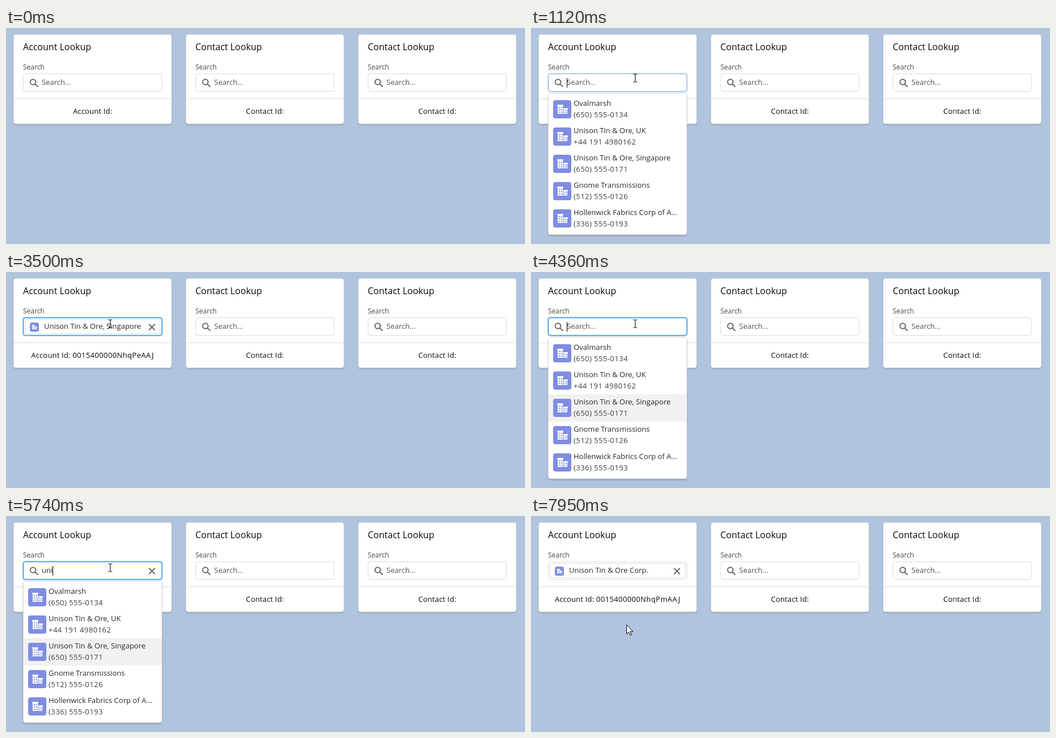
An HTML page for the animation above (8 s loop, 914 by 380 pixels).

```html
<!DOCTYPE html>
<html lang="en">
<head>
<meta charset="utf-8">
<title>Lookup</title>
<style>
html, body { margin: 0; width: 100%; height: 100%; overflow: hidden; background: #b0c4de; }
svg { display: block; width: 914px; height: 380px; }
text { font: 13px "Open Sans", "Noto Sans", sans-serif; fill: #2b2826; white-space: pre; }
.title { font-size: 16px; fill: #080707; }
.label { font-size: 12px; fill: #4a4846; }
.hint { fill: #54514f; }
.foot { fill: #080707; text-anchor: middle; letter-spacing: .16px; }
.id { letter-spacing: .37px; }
.phone { letter-spacing: .45px; fill: #3e3e3c; }
.box { fill: #fff; stroke: #dddbda; }
.card { filter: drop-shadow(0 2px 1px rgba(0, 0, 0, .13)); }
.menu { filter: drop-shadow(0 2px 1.5px rgba(0, 0, 0, .18)); }
.ring { fill: none; stroke: #1589ee; }
.glow { fill: none; stroke: #0070d2; stroke-width: 3; opacity: .25; }
.tool { fill: none; stroke: #6b6570; stroke-width: 2; }
.pointer { fill: #fff; stroke: #000; stroke-linejoin: round; }
</style>
</head>
<body>
<svg id="stage" viewBox="0 0 914 380" xmlns="http://www.w3.org/2000/svg"></svg>
<script>
const LOOP = 8000;
const CARD_GAP = 303.5;
const ROW_TOP = 119, ROW_H = 48;
const PLACE = 'Unison Tin & Ore';
const LISTS = [
  [
    ['Ovalmarsh', '(650) 555-0134'],
    [PLACE + ', UK', '+44 191 4980162'],
    [PLACE + ', Singapore', '(650) 555-0171'],
    ['Gnome Transmissions', '(512) 555-0126'],
    ['Hollenwick Fabrics Corp of A...', '(336) 555-0193']
  ],
  [
    ['Prompt Carriage and Transfers', '(503) 555-0148'],
    [PLACE + ' Corp.', '(212) 555-0150'],
    [PLACE + ', Singapore', '(650) 555-0171'],
    [PLACE + ', UK', '+44 191 4980162'],
    ['University of Arizona', '(520) 555-0119']
  ]
];

const stage = document.getElementById('stage');

function add(parent, tag, attrs, text) {
  const el = document.createElementNS(stage.namespaceURI, tag);
  for (const key in attrs) el.setAttribute(key, attrs[key]);
  if (text) el.textContent = text;
  parent.appendChild(el);
  return el;
}
const group = (parent, attrs) => add(parent, 'g', attrs || {});
const label = (parent, x, y, cls, text) => add(parent, 'text', { x, y, class: cls }, text);
const rect = (parent, x, y, width, height, rx, attrs) =>
  add(parent, 'rect', { x, y, width, height, rx, ...attrs });
const show = (el, on) => el.setAttribute('visibility', on ? 'inherit' : 'hidden');
const setText = (el, text) => { if (el.textContent !== text) el.textContent = text; };

function building(parent, x, y, size) {
  const g = group(parent, { transform: `translate(${x} ${y}) scale(${size / 32})` });
  rect(g, 0, 0, 32, 32, size < 20 ? 7 : 4, { fill: '#7f8de1' });
  add(g, 'path', {
    fill: '#fff', 'fill-rule': 'evenodd',
    d: 'M7 8h11v2h-1v14H8V10H7ZM10 12v2h2v-2ZM13.5 12v2h2v-2ZM10 16v2h2v-2ZM13.5 16v2h2v-2Z' +
       'M10 20v2h2v-2ZM13.5 20v2h2v-2ZM18 14h8v2h-1v8h-7ZM19.5 17v2h1.5v-2ZM22.3 17v2h1.5v-2Z' +
       'M19.5 20.5v2h1.5v-2ZM22.3 20.5v2h1.5v-2Z'
  });
}

function makeCard(i, name) {
  const g = group(stage, { transform: `translate(${i * CARD_GAP} 0)` });
  rect(g, 13.5, 11.5, 278, 157, 4, { class: 'box card' });
  label(g, 30, 39, 'title', name + ' Lookup');
  label(g, 30, 73, 'label', 'Search');
  add(g, 'path', { d: 'M13.5 124.5H291.5', stroke: '#dddbda' });
  const foot = label(g, 152.5, 151, 'foot', name + ' Id:');
  rect(g, 30.5, 80.5, 244, 31, 4, { class: 'box' });
  const search = group(g);
  add(search, 'path', {
    class: 'tool',
    d: 'M52.4 95a4.8 4.8 0 1 1 -9.6 0a4.8 4.8 0 1 1 9.6 0M51 98.5L56.4 103.6'
  });
  const hint = label(search, 63, 100, 'hint', 'Search...');
  return { g, foot, search, hint };
}

const [card] = ['Account', 'Contact', 'Contact'].map((name, i) => makeCard(i, name));
const idPart = add(card.foot, 'tspan', { class: 'id' });

const ring = group(stage);
rect(ring, 30, 80, 245, 32, 4, { class: 'glow' });
rect(ring, 30.5, 80.5, 244, 31, 4, { class: 'ring' });

const pill = group(stage);
rect(pill, 33.5, 83.5, 238, 25, 2, { class: 'box' });
building(pill, 42, 89, 16);
const pillName = label(pill, 67, 100, '', '');
const typed = label(stage, 63, 100, '', '');
const clear = add(stage, 'path', { class: 'tool', d: 'M251.8 91.8l10.4 10.4m0 -10.4l-10.4 10.4' });
const caret = rect(stage, 63, 88, 1, 17, 0, { fill: '#000' });

const menu = group(stage);
rect(menu, 30.5, 114.5, 244, 249, 4, { class: 'box menu' });
const rows = LISTS[0].map((_, i) => {
  const g = group(menu, { transform: `translate(0 ${ROW_TOP + i * ROW_H})` });
  const back = rect(g, 31, 0, 243, ROW_H, 0, { fill: '#f2f1f1' });
  building(g, 39, 8, 32);
  return { back, name: label(g, 75, 18, '', ''), phone: label(g, 75, 38, 'phone', '') };
});

const cursors = {
  arrow: add(stage, 'path', {
    class: 'pointer', d: 'M.5 .5V16.5L4.2 13.2L6.7 18.7L9 17.7L6.6 12.2H11.5Z'
  }),
  beam: add(stage, 'path', {
    fill: 'none', stroke: '#000',
    d: 'M-3 -7H-1L.5 -6L2 -7H4M.5 -6.5V6.5M-3 7H-1L.5 6L2 7H4'
  }),
  hand: add(stage, 'path', {
    class: 'pointer',
    d: 'M1.5 .5C.4 .5 0 1.2 0 2V13L-2 11C-3 10 -4.4 10.5 -4.4 11.7C-4.4 13 -1.4 16 0 18.6V22.5H9.5V19' +
       'C11 17 11.6 15.5 11.6 12V9.5C11.6 8 9.2 7.7 8.8 9C8.6 7.4 6.2 7.2 6 8.5C5.6 7 3.3 7 3 8V2' +
       'C3 1.1 2.6 .5 1.5 .5ZM3 8V12M6 8.5V12M8.8 9V12'
  })
};

const within = (t, ...spans) => spans.some(([a, b]) => t >= a && t < b);
const bezier = (a, b, c, p) => a * (1 - p) ** 2 + 2 * b * p * (1 - p) + c * p * p;

// Pointer moves in the same coarse steps as the screen capture
function pointerAt(t) {
  if (t < 120) return null;
  if (t < 820) {
    const p = Math.floor((t - 120) / 700 * 9) / 9;
    const e = bezier(0, .55, 1, p);
    return [bezier(740, 430, 173, e), bezier(335, -55, 83, e)];
  }
  if (t < 970) return [173, 83];
  if (t < 1120) return [189, 91];
  if (t < 1200) return [183, 88];
  if (t < 6880) return [183, 91];
  if (t < 7950) {
    const p = Math.min(7, Math.floor((t - 6880) / 75) + 1) / 7;
    const e = bezier(0, .6, 1, p);
    return [183 - 15 * e, 91 + 96 * e];
  }
  return [168, 191];
}

function overInput(x, y) {
  const local = (x - 30) % CARD_GAP;
  return x >= 30 && local <= 245 && y >= 80 && y <= 112;
}

function ringAt(t) {
  if (within(t, [1120, 1200], [7570, 7650])) return .45;
  return within(t, [1200, 7570]) ? 1 : 0;
}

function render(t) {
  const open = within(t, [1120, 3420], [4360, 7570]);
  const picked = within(t, [3420, 4360], [7570, LOOP]);
  const last = t >= 7570;
  const count = within(t, [5360, 7570]) ? 1 + (t >= 5610) + (t >= 5740) : 0;

  ring.setAttribute('opacity', ringAt(t));
  show(card.search, !picked);
  show(card.hint, !picked && !count);
  show(pill, picked);
  setText(pillName, PLACE + (last ? ' Corp.' : ', Singapore'));
  setText(idPart, picked ? ` 0015400000NhqP${last ? 'm' : 'e'}AAJ` : '');
  setText(typed, 'uni'.slice(0, count));
  show(clear, picked || count);
  caret.setAttribute('x', [63, 71, 79, 82][count]);
  show(caret, within(t, [1120, 1680], [2160, 2870], [4360, 4910], [5360, 6250], [6710, 7180]));

  const at = pointerAt(t);
  const hover = open && at ? Math.floor((at[1] - ROW_TOP) / ROW_H) : -1;
  const active = [2380, 2530, 2700].filter(k => t >= k).length - 1;
  const list = LISTS[t >= 6400 ? 1 : 0];
  show(menu, open);
  rows.forEach((row, i) => {
    show(row.back, open && (i === hover || i === active));
    setText(row.name, list[i][0]);
    setText(row.phone, list[i][1]);
  });

  const kind = !at ? '' : overInput(...at) ? 'beam' : hover >= 0 ? 'hand' : 'arrow';
  for (const key in cursors) {
    show(cursors[key], key === kind);
    if (key === kind) {
      cursors[key].setAttribute('transform', `translate(${at.map(Math.round).join(' ')})`);
    }
  }
}

const start = performance.now();
function tick() {
  render((performance.now() - start) % LOOP);
  requestAnimationFrame(tick);
}
tick();
</script>
</body>
</html>
```
